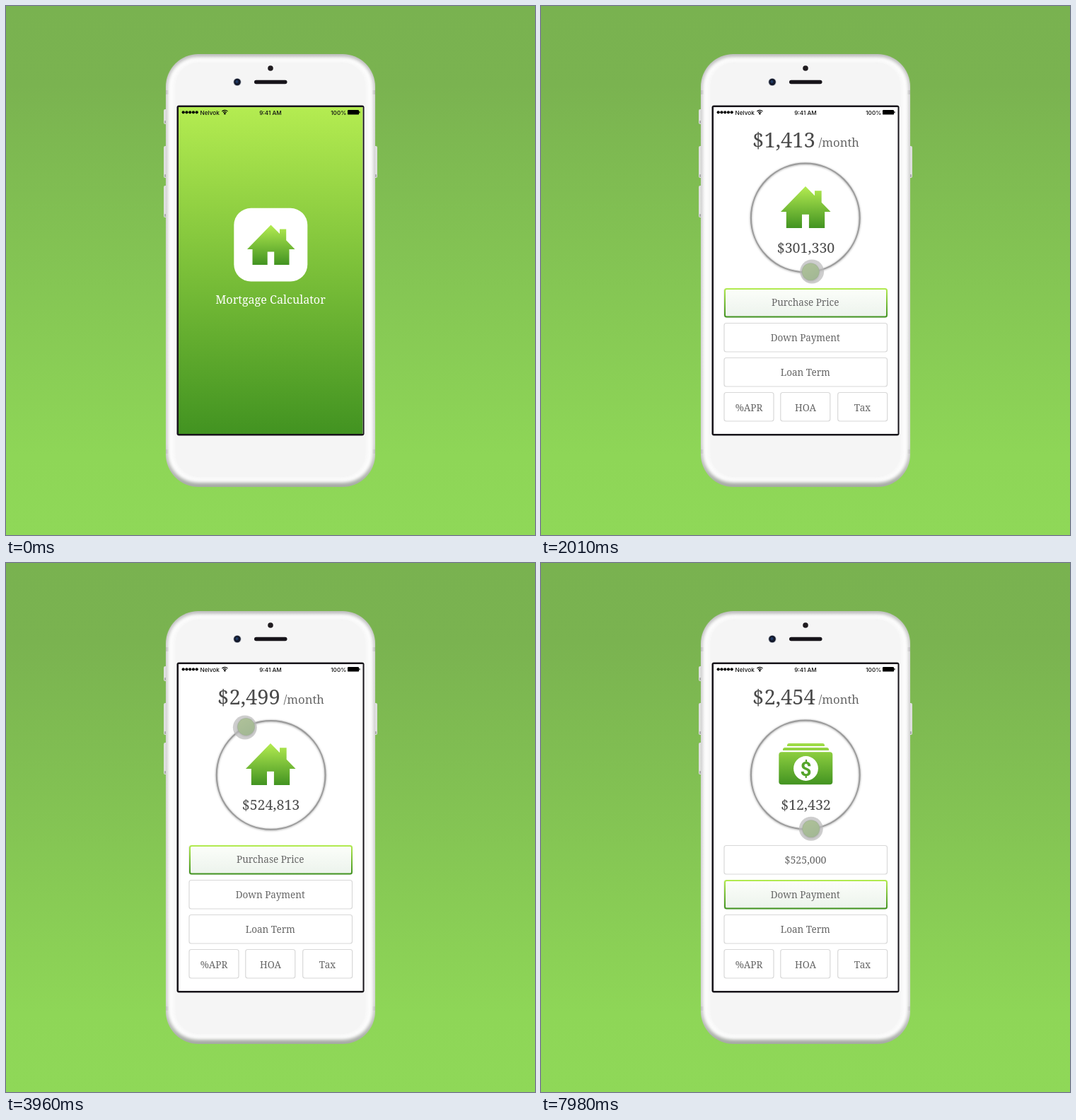
These frames come from a looping animation (748 px wide and 748 px high, 8000 ms). An HTML page with a canvas:

```html
<!DOCTYPE html>
<html lang="en">
<head>
<meta charset="utf-8">
<title>Mortgage Calculator</title>
<style>
html, body { margin: 0; width: 100%; height: 100%; overflow: hidden; background: #84c554; }
canvas { display: block; width: 748px; height: 748px; }
</style>
</head>
<body>
<canvas id="stage" width="748" height="748"></canvas>
<script>
const SIZE = 748, LOOP = 8000, STEP = 30;
const LIGHT = '#b4ec51', DARK = '#429321';
const SERIF = '"Noto Serif", serif', SANS = 'Inter, "Liberation Sans", sans-serif';
const ctx = document.getElementById('stage').getContext('2d');

const clamp = v => Math.min(1, Math.max(0, v));
const span = (t, start, length) => clamp((t - start) / length);
const mix = (a, b, p) => a + (b - a) * p;
const smooth = p => (1 - Math.cos(Math.PI * p)) / 2;

// cubic-bezier(.25, .1, .25, 1)
function ease(p) {
  if (p <= 0 || p >= 1) return clamp(p);
  const curve = (a, b, s) => 3 * a * s * (1 - s) ** 2 + 3 * b * s * s * (1 - s) + s ** 3;
  let lo = 0, hi = 1;
  for (let i = 0; i < 24; i++) {
    const mid = (lo + hi) / 2;
    if (curve(.25, .25, mid) < p) lo = mid; else hi = mid;
  }
  return curve(.1, 1, lo);
}

// Smooth curve through [time, value] points, at rest at both ends
function track(points, t) {
  const last = points.length - 1;
  if (t <= points[0][0]) return points[0][1];
  if (t >= points[last][0]) return points[last][1];
  const slope = i => i === 0 || i === last ? 0 :
    (points[i + 1][1] - points[i - 1][1]) / (points[i + 1][0] - points[i - 1][0]);
  let i = 0;
  while (t >= points[i + 1][0]) i++;
  const [t0, a] = points[i], [t1, b] = points[i + 1];
  const h = t1 - t0, u = (t - t0) / h;
  return mix(a, b, u * u * (3 - 2 * u)) +
    h * (slope(i) * u * (1 - u) ** 2 - slope(i + 1) * u * u * (1 - u));
}

function linear(c, x0, y0, x1, y1, ...colors) {
  const g = c.createLinearGradient(x0, y0, x1, y1);
  colors.forEach((color, i) => g.addColorStop(i / (colors.length - 1), color));
  return g;
}

function box(c, x, y, w, h, r, fill) {
  c.beginPath();
  c.roundRect(x, y, w, h, r);
  c.fillStyle = fill;
  c.fill();
}

function disc(c, x, y, r, fill) {
  c.beginPath();
  c.arc(x, y, r, 0, Math.PI * 2);
  c.fillStyle = fill;
  c.fill();
}

function label(c, str, x, y, font, color, align = 'center') {
  c.font = font;
  c.textAlign = align;
  c.fillStyle = color;
  c.fillText(str, x, y);
}

function withAlpha(alpha, draw) {
  if (alpha <= 0) return;
  ctx.save();
  ctx.globalAlpha *= alpha;
  draw();
  ctx.restore();
}

// Backdrop and phone never change, so they are painted once
function paintPhone() {
  const canvas = document.createElement('canvas');
  canvas.width = canvas.height = SIZE;
  const c = canvas.getContext('2d');

  const sky = c.createLinearGradient(0, 0, 0, SIZE);
  [[0, '#79b250'], [.15, '#7ab350'], [.85, '#8ed657'], [1, '#8fd858']]
    .forEach(([at, color]) => sky.addColorStop(at, color));
  c.fillStyle = sky;
  c.fillRect(0, 0, SIZE, SIZE);

  const key = (x, y, h) => {
    box(c, x, y, 6, h, 2, '#dedfde');
    box(c, x + 1, y + h - 5, 4, 4, 1, '#a9aaa9');
  };
  key(223, 146, 21);
  key(223, 198, 45);
  key(223, 254, 45);
  key(519, 198, 45);

  const rim = c.createLinearGradient(0, 68, 0, 680);
  [[0, '#bdbdbd'], [.1, '#d2d2d2'], [.9, '#d0d0d0'], [1, '#a6aaa4']]
    .forEach(([at, color]) => rim.addColorStop(at, color));
  box(c, 226, 68, 296, 612, 46, rim);
  for (const y of [119, 627]) {
    c.fillStyle = '#b9b9b9';
    c.fillRect(226, y, 4, 6);
    c.fillRect(518, y, 4, 6);
  }
  c.filter = 'blur(2px)';
  box(c, 229, 72, 290, 602, 42, '#fdfdfd');
  box(c, 237, 78, 274, 590, 36, '#f5f5f5');
  c.filter = 'none';
  box(c, 240, 80, 268, 586, 34, '#f5f5f5');

  disc(c, 374, 88, 3.8, '#201c20');
  disc(c, 327, 107.5, 5.6, '#b4b8bf');
  disc(c, 327, 107.5, 4.8, '#141a2c');
  disc(c, 326.5, 107, 2, '#1f3a66');
  box(c, 351, 104.8, 46.5, 5.4, 2.7, '#17141a');
  box(c, 241.5, 140.5, 265, 467, 3, '#17141a');
  return canvas;
}

function statusBar() {
  for (let i = 0; i < 5; i++) disc(ctx, 250.7 + i * 4.75, 150.3, 2.1, '#000');
  const font = '500 8.2px ' + SANS;
  label(ctx, 'Nelvok', 274.6, 154, font, '#111', 'left');
  label(ctx, '9:41 AM', 374, 154, font, '#111');
  label(ctx, '100%', 481.3, 154, font, '#111', 'right');
  ctx.strokeStyle = '#000';
  ctx.lineWidth = 1.1;
  for (const r of [3.2, 5.6]) {
    ctx.beginPath();
    ctx.arc(309.4, 153, r, -Math.PI * .76, -Math.PI * .24);
    ctx.stroke();
  }
  disc(ctx, 309.4, 152.2, 1.2, '#000');
  box(ctx, 483, 147, 16, 6.6, 1.2, '#000');
  box(ctx, 499.3, 149, 1.2, 2.6, .5, '#000');
}

function house(x, y, scale) {
  const path = [[0, 0], [12.5, 12.6], [12.5, 6], [21.7, 6], [21.7, 21.8], [34, 34.5], [26, 34.5],
    [26, 56.5], [4.7, 56.5], [4.7, 38], [-4.8, 38], [-4.8, 56.5], [-26, 56.5], [-26, 34.5], [-33.5, 34.5]];
  ctx.beginPath();
  for (const [px, py] of path) ctx.lineTo(x + px * scale, y + py * scale);
  ctx.closePath();
  ctx.fillStyle = linear(ctx, 0, y, 0, y + 56.5 * scale, LIGHT, DARK);
  ctx.fill();
}

function cash() {
  const fill = linear(ctx, 0, 250, 0, 313.5, '#a9e44b', DARK);
  box(ctx, 348, 255, 53, 4, [3, 3, 0, 0], fill);
  box(ctx, 342, 261, 65, 4, [3, 3, 0, 0], fill);
  box(ctx, 336.3, 267.3, 76, 46, 4, fill);
  disc(ctx, 374.5, 290.5, 17.4, '#fff');
  label(ctx, '$', 374.5, 300.5, 'bold 28px Roboto, sans-serif', '#55a52b');
}

function splash() {
  ctx.fillStyle = linear(ctx, 0, 143, 0, 605, LIGHT, DARK);
  ctx.fillRect(244, 143, 260.5, 462);
  box(ctx, 322.3, 285.8, 104, 103.8, 24, '#fff');
  house(374.5, 309.5, 1);
  label(ctx, 'Mortgage Calculator', 374, 420.5, '16.1px ' + SERIF, '#fff');
}

function plainButton(x, y, w) {
  ctx.beginPath();
  ctx.roundRect(x + .5, y + .5, w - 1, 40.5, 3);
  ctx.lineWidth = 1.2;
  ctx.strokeStyle = '#d8d8d8';
  ctx.stroke();
}

function activeButton(y) {
  box(ctx, 259, y, 231, 41.5, 3, linear(ctx, 0, y, 0, y + 41, '#fcfefa', '#ecf3ec'));
  ctx.beginPath();
  ctx.roundRect(260, y + 1, 229, 39.5, 2.5);
  ctx.lineWidth = 2;
  ctx.strokeStyle = linear(ctx, 0, y, 0, y + 41, LIGHT, DARK);
  ctx.stroke();
}

function caption(str, x, y, size = 13.5) {
  label(ctx, str, x, y, `300 ${size}px ${SERIF}`, '#666');
}

const money = v => '$' + Math.round(v).toLocaleString('en-US');

function angleAt(t) {
  if (t < 5700) return track([[1800, 0], [2520, 84], [3330, 411], [4035, 570]], t);
  if (t < 7000) return mix(570, 360, smooth(span(t, 5770, 800)));
  return 6 * span(t, 7400, 580) ** 2.2;
}

function onRing(deg) {
  const a = deg * Math.PI / 180;
  const cx = 374.25 - .45 * Math.cos(a), cy = 299.6 - .2 * Math.cos(a);
  return { cx, cy, x: cx + 76.7 * Math.sin(a), y: cy + 76.7 * Math.cos(a) };
}

function dial(t) {
  const { cx, cy, x, y } = onRing(angleAt(t));
  ctx.save();
  ctx.shadowColor = 'rgba(0,0,0,.45)';
  ctx.shadowBlur = 3;
  ctx.shadowOffsetY = .5;
  ctx.beginPath();
  ctx.arc(cx, cy, 76.9, 0, Math.PI * 2);
  ctx.lineWidth = 2;
  ctx.strokeStyle = '#9b9b9b';
  ctx.stroke();
  ctx.shadowOffsetY = 1;
  disc(ctx, x, y, 12.3, '#5c9f2f');
  ctx.restore();
  disc(ctx, x, y, 11.5, linear(ctx, x - 6, y - 11, x + 6, y + 11, '#8ccf3f', '#62b02f'));
}

function home(t) {
  const swap = smooth(span(t, 5770, 800));
  const drag = span(t, 7400, 580) ** 2.2;
  const price = t < 7000
    ? track([[1800, 1400], [2520, 1582], [3330, 2253], [3990, 2500]], t)
    : mix(2500, 2454, drag);
  const amount = track([[1800, 300000], [2520, 329236], [3330, 465047], [3990, 525000]], t);
  const amountFont = '19.6px ' + SERIF;

  label(ctx, money(price), 343.5, 199.5, '29.2px ' + SERIF, '#4a4a4a');
  label(ctx, '/month', 392.5, 198.5, '300 16.7px ' + SERIF, '#666', 'left');

  withAlpha(1 - swap, () => {
    house(374, 255, 1.045);
    label(ctx, money(amount), 374.5, 348.7, amountFont, '#4a4a4a');
  });
  withAlpha(swap, () => {
    cash();
    label(ctx, money(12432 * drag), 374.5, 348.7, amountFont, '#4a4a4a');
  });
  dial(t);

  for (const y of [399, 448, 497]) plainButton(258.5, y, 231.5);
  for (const x of [258.5, 338.3, 419.2]) plainButton(x, 546, 71);
  withAlpha(1 - swap, () => {
    activeButton(399);
    caption('Purchase Price', 373.7, 424.3);
  });
  withAlpha(swap, () => {
    activeButton(448);
    caption('$525,000', 374, 425, 14.2);
  });
  caption('Down Payment', 373.7, 474);
  caption('Loan Term', 373.8, 523.3);
  caption('%APR', 294, 572.5);
  caption('HOA', 374, 572.5);
  caption('Tax', 454.5, 572.5);
}

function finger(t) {
  const spot = (x, y, r, alpha) =>
    withAlpha(alpha, () => disc(ctx, x, y, r, 'rgba(188,188,188,.72)'));
  const onDial = (r, alpha) => {
    const { x, y } = onRing(angleAt(t + 23));
    spot(x, y, r, alpha);
  };
  if (t >= 1590 && t < 4470) {
    const lift = span(t, 4140, 330);
    onDial(17 + 2.5 * lift, span(t, 1560, 270) * (1 - lift));
  } else if (t >= 5520 && t < 6000) {
    if (t < 5640) spot(376, 468, 19, .27);
    else spot(376, 468, 17 + 2 * span(t, 5760, 240), .8 * (1 - span(t, 5760, 240)));
  } else if (t >= 7200) {
    onDial(17, span(t, 7170, 270));
  }
}

const phone = paintPhone();

function render(t) {
  ctx.drawImage(phone, 0, 0);
  ctx.save();
  ctx.beginPath();
  ctx.rect(244, 143, 260.5, 462);
  ctx.clip();
  ctx.fillStyle = '#fff';
  ctx.fillRect(244, 143, 261, 462);

  const leave = ease(span(t, 465, 500));
  const enter = ease(span(t, 955, 375));
  const first = t < 960;
  if (first) splash(); else home(t);
  ctx.fillStyle = `rgba(255,255,255,${first ? leave : 1 - enter})`;
  ctx.fillRect(244, 143, 261, 462);

  finger(t);
  statusBar();
  ctx.restore();
}

const begin = performance.now();
function tick() {
  const t = (performance.now() - begin) % LOOP;
  render(Math.floor(t / STEP) * STEP);
  requestAnimationFrame(tick);
}
tick();
</script>
</body>
</html>
```
